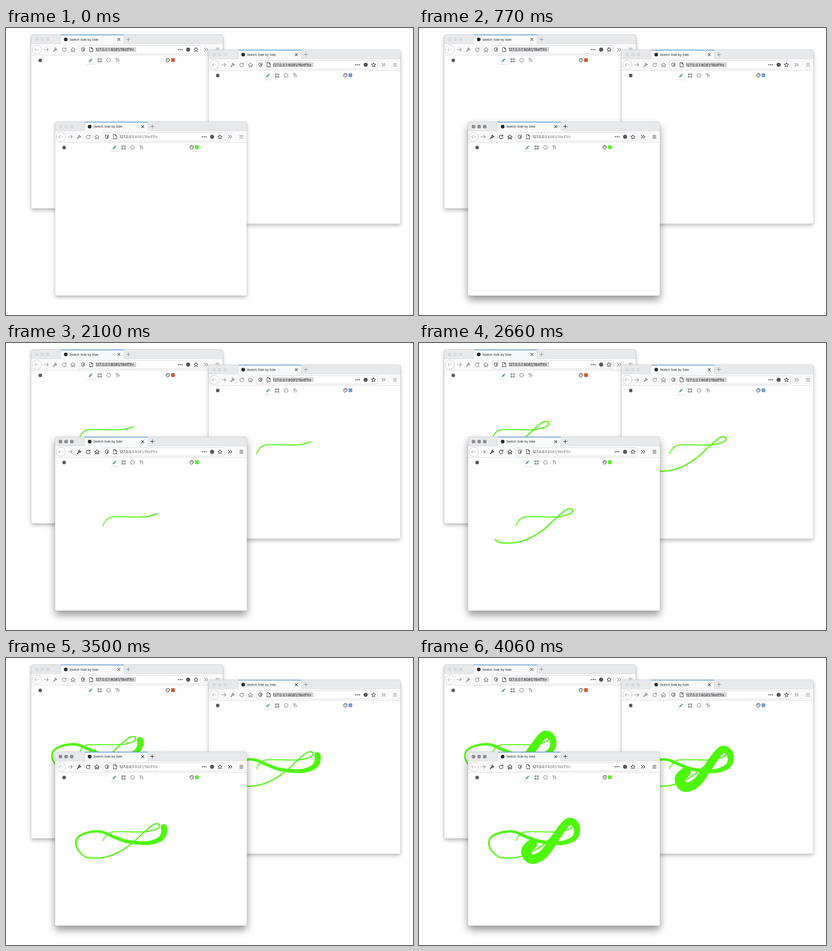
An HTML page for the animation above (4.13 s loop, 891 by 628 pixels).

```html
<!DOCTYPE html>
<html lang="en">
<head>
<meta charset="utf-8">
<title>Shared sketch</title>
<style>
html, body { margin: 0; width: 100%; height: 100%; overflow: hidden; background: #fff; }
svg { display: block; width: 100vw; height: 100vh; }
text { font-family: Inter, "Open Sans", sans-serif; white-space: pre; }
.win { --icon: #85858a; --dot: #dadbdd; --plus: #8c8c90; }
.win.active { --icon: #2e2e33; --dot: #8d8d8f; --plus: #3c3c40; }
.frame { fill: #fff; filter: url(#low); }
.active .frame { filter: url(#high); }
.line { fill: none; stroke-width: 1.1; stroke-linecap: round; stroke-linejoin: round; }
.ui { stroke: var(--icon); }
.dark { stroke: #48484c; }
.soft { stroke: #929296; }
</style>
</head>
<body>
<svg id="stage" viewBox="0 0 891 628" preserveAspectRatio="none"></svg>
<script>
const LOOP = 4130, STEP = 70, FOCUS = 770, TOUCH = 1050, DRAW = 1330;
const W = 420, H = 380.5;

// Pen positions inside the front window, one per drawing step
const pen = [
  212,400, 214,395, 218,389,
  219,387, 221,385.5, 224,383.5, 229,381, 240,380, 253,380, 265,380, 277,380.5,
  292,380.5, 306,380, 320,377, 331,373, 336,367, 332,362.5, 321,365, 303,380,
  264,414, 221,434.5, 180,437, 166,429.5, 154,413, 154,397, 164,387, 184,380.5,
  208,380, 230,389, 263,401, 306,405, 323,402, 338,395, 345,384, 345,370,
  337,359, 325,359, 306,382, 277,424, 260,437, 243,439, 234,422, 247,407
];
const widthKeys = [[0, 1.6], [22, 2.7], [26, 4.6], [30, 8], [38, 19], [42, 22]];
const SUB = 4;
const last = pen.length / 2 - 1;

const point = i => {
  const k = Math.max(0, Math.min(last, i)) * 2;
  return [pen[k], pen[k + 1]];
};

function widthAt(k) {
  const j = Math.max(1, widthKeys.findIndex(key => key[0] >= k));
  const [a, wa] = widthKeys[j - 1], [b, wb] = widthKeys[j];
  return wa + (wb - wa) * (k - a) / (b - a);
}

function heading(i) {
  const [ax, ay] = point(i - 1), [bx, by] = point(i + 1);
  const d = Math.hypot(bx - ax, by - ay) || 1;
  return [(bx - ax) / d, (by - ay) / d];
}

// Hermite curve between pen positions i and i + 1
function curve(i, u) {
  const a = point(i), b = point(i + 1), ha = heading(i), hb = heading(i + 1);
  const len = Math.hypot(b[0] - a[0], b[1] - a[1]);
  const u2 = u * u, u3 = u2 * u;
  return [0, 1].map(c =>
    (2 * u3 - 3 * u2 + 1) * a[c] + (u3 - 2 * u2 + u) * len * ha[c] +
    (3 * u2 - 2 * u3) * b[c] + (u3 - u2) * len * hb[c]);
}

function strokeMarkup() {
  let out = "";
  for (let i = 0; i < last; i++) {
    for (let s = 0; s < SUB; s++) {
      const [x1, y1] = curve(i, s / SUB), [x2, y2] = curve(i, (s + 1) / SUB);
      const w = widthAt(i + (s + 1) / SUB);
      out += `<line x1="${x1.toFixed(2)}" y1="${y1.toFixed(2)}" x2="${x2.toFixed(2)}" y2="${y2.toFixed(2)}" stroke-width="${w.toFixed(2)}"/>`;
    }
  }
  return out;
}

const icon = (x, y, d, kind = "ui", extra = "") =>
  `<path class="line ${kind}" transform="translate(${x} ${y})" d="${d}" ${extra}/>`;
const disc = (x, y, r, fill) => `<circle cx="${x}" cy="${y}" r="${r}" fill="${fill}"/>`;
const rect = (x, y, w, h, attrs) => `<rect x="${x}" y="${y}" width="${w}" height="${h}" ${attrs}/>`;

const star = Array.from({ length: 10 }, (_, i) => {
  const r = i % 2 ? 2.3 : 5, a = (i / 5 - 0.5) * Math.PI;
  return (i ? "L" : "M") + (r * Math.cos(a)).toFixed(2) + " " + (r * Math.sin(a)).toFixed(2);
}).join("") + "Z";

function tabBar() {
  return `<path d="M0 20V5Q0 0 5 0H${W - 5}Q${W} 0 ${W} 5V20Z" fill="#e7e8ea"/>` +
    rect(65, 0, 138, 20, 'fill="#f8f9fa"') +
    rect(65, 0, 138, 1.6, 'fill="#63a9e4"') +
    `<path d="M64.7 1V20M203.3 1V20" stroke="#d2d3d6" stroke-width=".7"/>` +
    [12, 24.3, 36.6].map(x => disc(x, 10.6, 4, "var(--dot)")).join("") +
    disc(75.8, 10.6, 4, "#29292c") +
    `<text x="84" y="13" font-size="6.75" fill="#202024">Sketch Side by Side</text>` +
    icon(192, 10.6, "M-2.6-2.6L2.6 2.6M2.6-2.6L-2.6 2.6", "", 'stroke="#2c2c30"') +
    icon(213, 10.2, "M-4 0H4M0-4V4", "", 'stroke="var(--plus)"');
}

function navBar(selected) {
  const ends = selected ? "#1c1c20" : "#77777c";
  return rect(0, 20, W, 25.3, 'fill="#f9f9fa"') +
    `<path d="M0 20H65M203 20H${W}" stroke="#d3d4d7" stroke-width=".7"/>` +
    `<path d="M0 45.4H${W}" stroke="#dcdcdf" stroke-width=".9"/>` +
    `<circle cx="12.5" cy="32.8" r="10" fill="#fcfcfc" stroke="#c9c9cc" stroke-width=".9"/>` +
    icon(12.5, 32.8, "M4.5 0H-4.5M-1-3.7L-4.7 0L-1 3.7", "", 'stroke="#c3c3c7"') +
    icon(33, 32.8, "M-4.5 0H4.5M1-3.7L4.7 0L1 3.7", "soft") +
    icon(52.5, 33, "M-3.6 3.8L.6-.4", "ui", 'style="stroke-width:1.9"') +
    icon(52.5, 33, "M1.7-4.2A2.6 2.6 0 1 0 4.2-1.3L2.2-1L1.4-1.9Z") +
    icon(72.5, 33, "M3.2-2.5A4.1 4.1 0 1 0 4.1.7M3.9-4.5V-1.7H1") +
    icon(91.7, 33, "M-4.9 0L0-4.6L4.9 0M-3.5-.8V4.4H-1.2V1H1.2V4.4H3.5V-.8") +
    rect(105, 24, 265, 18, 'rx="2" fill="#fff" stroke="#d4d4d8" stroke-width=".9"') +
    icon(113.6, 32.8, "M0-4.3L3.6-3.2V0Q3.3 3 0 4.5Q-3.3 3-3.6 0V-3.2Z", "dark") +
    `<path d="M113.6 30.5L115.6 31.2V33Q115.3 34.6 113.6 35.5Z" fill="#48484c"/>` +
    `<path d="M122.7 27.5V38.5" stroke="#e2e2e4" stroke-width=".7"/>` +
    icon(131.5, 32.8, "M-3.6-4.6H.8L3.6-1.8V4.6H-3.6ZM.8-4.6V-1.8H3.6", "dark") +
    (selected ? rect(141, 27.4, 89, 10.6, 'fill="#d5d5d7"') : "") +
    `<text x="141" y="35.9" font-size="8.13" fill="#1c1c20">127.0.0.1<tspan fill="${ends}">:8081/19xtf1tv</tspan></text>` +
    [322.6, 326.5, 330.4].map(x => disc(x, 32.8, 1.25, "#48484c")).join("") +
    disc(343.8, 32.8, 4.6, "#58585c") +
    icon(361, 33, star, "dark") +
    icon(383, 32.8, "M-3.6-3.4L-.3 0L-3.6 3.4M.7-3.4L4 0L.7 3.4") +
    icon(408, 32.8, "M-3.6-3H3.6M-3.6 0H3.6M-3.6 3H3.6");
}

function appBar(color) {
  const corners = [[-3.2, -3], [3.2, -3], [-3.2, 3.2], [3.2, 3.2]]
    .map(([x, y]) => rect(150 + x - 1.1, 56.2 + y - 1.1, 2.2, 2.2, 'fill="#606064"')).join("");
  return disc(20, 56.3, 3.9, "#5a5a5e") +
    `<path transform="translate(130 56.2)" d="M-4 4L-3.4 1.6L1.4-3.2L3.3-1.3L-1.5 3.5ZM2-3.8L2.8-4.4L4.4-2.8L3.8-1.9Z" fill="#43969b"/>` +
    rect(120.5, 65, 19.5, 1, 'fill="#d3d4d6"') +
    icon(150, 56.2, "M-3.2-3H3.2V3.2H-3.2Z", "", 'stroke="#707074"') + corners +
    `<circle cx="169.6" cy="56" r="4" class="line" stroke="#737377"/>` +
    icon(189, 56.4, "M-4-3.5H1.5M-1.2-3.5V3.6M1-.6H4.2M2.6-.6V3.6", "", 'stroke="#77777b"') +
    icon(299.5, 56, "M.3 4.1A4.1 4.1 0 1 1 4.1-.5Q4.1 1.3 2.3 1.2Q.5 1 1 2.7Q1.3 4 .3 4.1Z", "dark") +
    [[-2.2, -.3], [-.9, -2.2], [1.4, -2]].map(([x, y]) => disc(299.5 + x, 56 + y, .75, "#48484c")).join("") +
    rect(306.6, 51.8, 7.8, 7.8, `fill="${color}" stroke="#0002" stroke-width=".6"`);
}

function browser(id, x, y, color, selected) {
  return `<g id="${id}" class="win" transform="translate(${x} ${y})">` +
    rect(0, 0, W, H, 'rx="4" class="frame"') +
    tabBar() + navBar(selected) + appBar(color) +
    `<use href="#ink" x="-107" y="-205"/>` +
    rect(0, 0, W, H, 'rx="4" fill="none" stroke="#000" stroke-opacity=".2" stroke-width=".7"') +
    `</g>`;
}

const shadow = (id, dy, blur, alpha) =>
  `<filter id="${id}" x="-15%" y="-15%" width="130%" height="130%">
    <feDropShadow dx="0" dy="${dy}" stdDeviation="${blur}" flood-color="#000" flood-opacity="${alpha}"/>
  </filter>`;

document.getElementById("stage").innerHTML =
  `<defs>${shadow("low", 4, 4, .27)}${shadow("high", 9, 8.5, .42)}
    <g id="ink" stroke="#4df808" stroke-linecap="round">${strokeMarkup()}</g></defs>` +
  browser("left", 55, 14.5, "#d4552f", true) +
  browser("right", 443.5, 47.7, "#6d9be6", true) +
  browser("front", 107.3, 205.2, "#50f51e", false);

const front = document.getElementById("front");
const lines = [...document.getElementById("ink").children];

function stepsAt(t) {
  if (t < TOUCH) return 0;
  if (t < DRAW) return t < TOUCH + STEP ? 1 : 2;
  return Math.min(last, 3 + Math.floor((t - DRAW) / STEP));
}

let shown = -1;
function render(t) {
  front.classList.toggle("active", t >= FOCUS);
  const count = stepsAt(t) * SUB;
  if (count === shown) return;
  shown = count;
  lines.forEach((line, i) => line.setAttribute("visibility", i < count ? "visible" : "hidden"));
}

const start = performance.now();
function tick() {
  render((performance.now() - start) % LOOP);
  requestAnimationFrame(tick);
}
tick();
</script>
</body>
</html>
```
